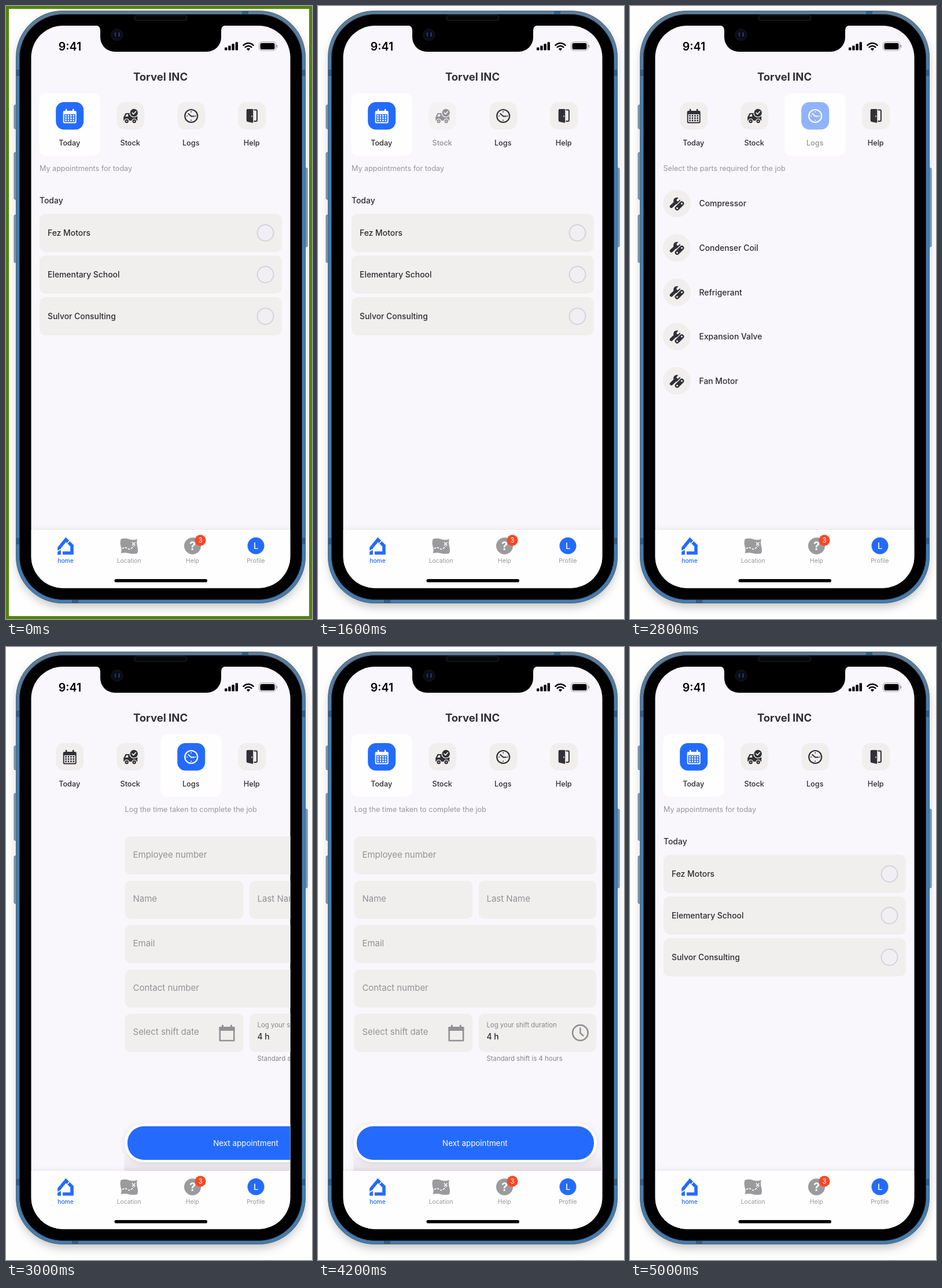
These frames come from a looping animation (529x1059 px, 6.6 s). An HTML page:

```html
<!DOCTYPE html>
<html lang="en">
<head>
<meta charset="utf-8">
<title>Field service app</title>
<style>
  html, body { margin: 0; width: 100%; height: 100%; overflow: hidden; background: #fefefe; }
  svg { display: block; font-family: Inter, sans-serif; --tile: #f1efed; --blue: #246bfd; --ink: #2c2b30; }
  .body { font-size: 13.9px; font-weight: 500; fill: var(--ink); }
  .sub { font-size: 12.6px; fill: #98969b; }
  .field { font-size: 15px; fill: #939196; }
  .small { font-size: 11.4px; fill: #87858b; }
  .nav { font-size: 10.3px; fill: #98979a; }
  .mid { text-anchor: middle; }
  .line { fill: none; stroke: currentColor; stroke-linecap: round; stroke-linejoin: round; }
  .tab { color: #303036; --bg: var(--tile); }
  .tab.on { color: #fff; --bg: var(--blue); }
  .tab .card { fill: none; }
  .tab.on .card { fill: #fefefe; }
  .tab .tile { fill: var(--bg); }
  .tab text { font-size: 12.7px; font-weight: 500; fill: var(--ink); }
</style>
</head>
<body>
<svg id="stage" width="529" height="1059" viewBox="0 0 529 1059"></svg>
<script>
const PAGE_WIDTH = 448, LOOP = 6600, STEP = 200;
const box = (x, y, w, h, r, attrs = '') => `<rect x="${x}" y="${y}" width="${w}" height="${h}" rx="${r}" ${attrs}/>`;
const dot = (x, y, r, attrs = '') => `<circle cx="${x}" cy="${y}" r="${r}" ${attrs}/>`;
const text = (x, y, cls, str, attrs = '') => `<text x="${x}" y="${y}" class="${cls}" ${attrs}>${str}</text>`;
const line = (d, width, attrs = '') => `<path class="line" d="${d}" stroke-width="${width}" ${attrs}/>`;
const range = (n, f) => Array.from({ length: n }, (_, i) => f(i)).join('');
const BG = 'style="fill:var(--bg)"', BG_LINE = 'style="stroke:var(--bg)"';

// Icons are drawn around 0,0 in the current colour
const calendar = box(-11.5, -9, 23, 21.5, 2.5) + box(-9.6, -3, 19.2, 13.6, 1, BG) +
  line('M-6 -11v4M6 -11v4', 2.6) +
  range(12, i => box(-7.9 + i % 4 * 4.4, -1.7 + (i >> 2) * 4, 2.6, 2.6, .4));
const truck = `<path d="M-12 8V2l3-6q.5-1 2-1h6v-2h11q2 0 2 2v13z"/>` +
  `<path d="M-9 1l2-4h3v4z" ${BG}/>` +
  [-6.5, 6.5].map(x => dot(x, 9, 4.6, BG) + dot(x, 9, 3.2) + dot(x, 9, 1.1, BG)).join('') +
  dot(6, -5.5, 8, BG) + dot(6, -5.5, 6.7) + line('M3 -5.5l2.2 2.3 4-4.4', 1.7, BG_LINE);
const clock = dot(0, 0, 11, 'class="line" stroke-width="2.2"') + line('M-5 -4L0 .5h5', 2) +
  line('M0 -7.5v.6M0 7v.6M-7.5 0h.6M7.2 0h.6', 1.7);
const door = '<path d="M-9.5 -10q0-2 2-2H2v24L-7.5 10q-2-.5-2-2.5z"/>' +
  line('M4 -10.5h3.2q1.5 0 1.5 1.5V7.5q0 1.5-1.5 1.5H4', 2) + box(-.8, -1, 1.2, 3, .6, BG);
const wrench = line('M-9.5 5L-1 -3', 5.5) + dot(0, -4.5, 6) + line('M1.5 -6L7 -11.5', 4, BG_LINE) +
  line('M.5 8L8.5 0', 10.5, BG_LINE) + line('M.5 8L8.5 0', 7.8) +
  dot(.5, 8, 1.5, BG) + dot(8.5, 0, 1.5, BG);

const tabs = [['Today', calendar], ['Stock', truck], ['Logs', clock], ['Help', door]].map(([name, icon], i) =>
  `<g class="tab" transform="translate(${110.2 + i * 105} 190)" fill="currentColor">` +
  box(-53, -39, 105.5, 107.5, 12, 'class="card"') +
  `<g class="touch">${box(-24, -24, 48, 47.5, 14, 'class="tile"')}${icon}${text(-.5, 50.7, 'mid', name)}</g></g>`).join('');

const todayPage = text(58, 285, 'sub', 'My appointments for today') + text(58, 341, 'body', 'Today') +
  ['Fez Motors', 'Elementary School', 'Sulvor Consulting'].map((name, i) => {
    const y = 359 + i * 72;
    return box(58, y, 419, 66, 10, 'fill="var(--tile)"') + text(72, y + 38, 'body', name) +
      dot(448.5, y + 33, 14, 'fill="#f1eff4" stroke="#d5d3da" stroke-width="2"');
  }).join('');

const stockPage = text(58, 285, 'sub', 'Select the parts required for the job') +
  ['Compressor', 'Condenser Coil', 'Refrigerant', 'Expansion Valve', 'Fan Motor'].map((name, i) => {
    const y = 341.3 + i * 76.6;
    return `<g transform="translate(81.5 ${y})" color="#303036" fill="currentColor" style="--bg:var(--tile)">` +
      dot(0, 0, 24, BG) + wrench + '</g>' + text(120, y + 5, 'body', name);
  }).join('');

const field = (x, y, w, label) => box(x, y, w, 66, 10, 'fill="var(--tile)"') + text(x + 14, y + 36.7, 'field', label);
const logsPage = text(58, 285, 'sub', 'Log the time taken to complete the job') +
  field(58, 327, 419, 'Employee number') + field(58, 403.7, 205, 'Name') + field(273, 403.7, 204, 'Last Name') +
  field(58, 480.3, 419, 'Email') + field(58, 557, 419, 'Contact number') +
  field(58, 633.6, 205, 'Select shift date') + field(273, 633.6, 204, '') +
  text(287, 657, 'small', 'Log your shift duration') + text(287, 678, 'body', '4 h') +
  text(287, 715, 'small', 'Standard shift is 4 hours') +
  '<g color="#929095">' + line('M222.3 658h24.4v22h-24.4z', 2.6) + box(221, 656, 27, 7, 1, 'fill="currentColor"') +
  line('M227 654v5M242 654v5', 3) + dot(449, 666.5, 13.3, 'class="line" stroke-width="2.7"') +
  line('M449 658.5v8.5l5 4.5', 2.5) + '</g>' +
  box(57, 872, 434, 33, 0, 'fill="url(#shade)"') +
  box(57.5, 823.5, 420, 66.5, 33, 'fill="#fff" filter="url(#lift)"') +
  box(62.5, 828, 410, 58, 28, 'fill="var(--blue)"') +
  text(267, 862, 'mid', 'Next appointment', 'font-size="13.4" fill="#fff"');

const sideButton = 'fill="#8299b1" stroke="#5f748a" stroke-width="1"';
const phone =
  box(20, 16, 496, 1022, 80, 'fill="#888" opacity=".5" filter="url(#blur)"') +
  [[171, 41], [253, 81], [361, 82]].map(([y, h]) => box(14, y, 6, h, 1.5, sideButton)).join('') +
  box(515, 280, 6, 136, 1.5, sideButton) +
  box(17.5, 8.5, 500, 1023, 80, 'fill="url(#metal)" stroke="#4b6275"') +
  '<path d="M18 110h5v11h-5zM512 110h5v11h-5zM18 919h5v11h-5zM512 919h5v11h-5zM408 9h11v5h-11zM114 1026h11v5h-11z" fill="#315d88"/>' +
  box(23.5, 14.5, 488, 1011, 75, 'fill="#000" stroke="#1d2f40"') +
  box(222.5, 16, 90, 9, 3, 'fill="#060606" stroke="#252528"') +
  box(43.5, 34, 448, 971.5, 55, 'fill="#faf7fc"');

const status =
  '<path d="M155 33.500q8 .500 8 8.500V54a25 25 0 0 0 25 25H347a25 25 0 0 0 25-25V42q0-8 8-8.500z"/>' +
  dot(192, 49.5, 10, 'fill="#0b0d13" stroke="#15171d"') + dot(192, 49.5, 5.5, 'fill="#080a18"') +
  line('M189.5 46.5q-2 3 0 5.5', 1.8, 'color="#263c83"') + line('M195 46.5q2 3 0 5.5', 1.8, 'color="#303f92"') +
  text(110.5, 76.5, 'mid', '9:41', 'font-size="19.5" font-weight="600"') +
  range(4, i => box(378 + i * 6.2, 71.5 - i * 3.1, 4.4, 5 + i * 3.1, 1.2)) +
  line('M410.5 67.8a12 12 0 0 1 17 0M413.7 71.2a7.5 7.5 0 0 1 10.6 0', 2.6) +
  '<path d="M415.8 74a4.6 4.6 0 0 1 6.4 0L419 77.2z"/>' +
  box(437.5, 62, 29, 15, 4.5, 'fill="none" stroke="#9b999d"') + box(439.5, 64, 25, 11, 2.8) +
  box(467.5, 67, 1.8, 5, .9, 'fill="#9b999d"') +
  text(267, 129, 'mid', 'Torvel INC', 'font-size="18.5" font-weight="700" fill="#2f2f33"');

const house = line('M92 948V936L103.500 922 114 932.500V945H98', 5.6, 'style="stroke-linecap:butt;stroke-linejoin:miter"') +
  line('M106.500 927.500L112 921.500M88 942.500L96 938', 1.6, 'style="stroke:#fefefe"');
const nav = box(43.5, 905, 448, 101, 0, 'fill="#fefefe" filter="url(#navShadow)"') +
  `<g color="#246bfd">${house}</g>` +
  '<path d="M198.5 921q7-2.500 14 0t14.500 0q-2 6 0 12.500t0 12q-7 2-14.500 0t-14 0q2-6 0-12t0-12.500z" fill="#9b9a9c"/>' +
  line('M201.5 937q4-3 8 0t8-1q3-1 3-3', 1.7, 'color="#fff" stroke-dasharray="2 3.400"') +
  line('M218.500 927l4.500 4.500M223 927l-4.500 4.500', 1.7, 'color="#fff"') +
  dot(322.5, 932.7, 14.5, 'fill="#9b9a9c"') +
  text(322.5, 940, 'mid', '?', 'font-size="20" font-weight="700" fill="#fff"') +
  dot(336, 923, 9.5, 'fill="#fb4726"') + text(336, 927, 'mid', '3', 'font-size="11.5" fill="#fff"') +
  dot(432, 932.5, 14.5, 'fill="var(--blue)"') +
  text(432.2, 937.8, 'mid', 'L', 'font-size="14.5" font-weight="500" fill="#fff"') +
  text(103, 962, 'nav mid', 'home', 'style="fill:var(--blue)" font-weight="500"') +
  ['Location', 'Help', 'Profile'].map((name, i) => text(212.7 + i * 109.6, 962, 'nav mid', name)).join('') +
  box(187.5, 990, 160.5, 5.6, 2.8);

const stage = document.getElementById('stage');
stage.innerHTML = `<defs>
  <filter id="blur" x="-20%" y="-10%" width="140%" height="120%"><feGaussianBlur stdDeviation="8"/></filter>
  <filter id="lift" x="-10%" y="-50%" width="120%" height="200%"><feDropShadow dx="0" dy="2" stdDeviation="5" flood-color="#54465c" flood-opacity=".16"/></filter>
  <filter id="navShadow" x="-10%" y="-20%" width="120%" height="140%"><feDropShadow dx="0" dy="-1" stdDeviation="3.5" flood-opacity=".08"/></filter>
  <linearGradient id="shade" x2="0" y2="1"><stop stop-color="#e9e2eb" stop-opacity="0"/><stop offset="1" stop-color="#e9e2eb"/></linearGradient>
  <linearGradient id="metal" x2="0" y2="1"><stop stop-color="#5f7c96"/><stop offset=".15" stop-color="#447cae"/></linearGradient>
  <clipPath id="screen">${box(43.5, 34, 448, 971.5, 55)}</clipPath></defs>` + phone +
  `<g clip-path="url(#screen)">${tabs}` +
  [todayPage, stockPage, logsPage].map(p => `<g class="page">${p}</g>`).join('') + nav + `</g>` + status +
  box(2.5, 2.5, 524, 1054, 0, 'id="border" fill="none" stroke="#528309" stroke-width="5"');

const tabNodes = stage.querySelectorAll('.tab'), pageNodes = stage.querySelectorAll('.page');
const border = document.getElementById('border');
const slides = [
  { start: 1600, from: 0, to: 1 },
  { start: 2774, from: 1, to: 2 },
  { start: 4146, from: 2, to: 0 },
];
const ease = p => p < .5 ? 4 * p ** 3 : 1 - 4 * (1 - p) ** 3;

function render(t) {
  const active = t < 1800 ? 0 : t < 2800 ? 1 : t < 4200 ? 2 : 0;
  const pressed = t === 1600 ? 1 : t === 2800 ? 2 : -1;
  tabNodes.forEach((tab, i) => {
    tab.classList.toggle('on', i === active);
    tab.querySelector('.touch').setAttribute('opacity', i === pressed ? .5 : 1);
  });

  const { start, from, to } = slides.findLast(s => t >= s.start) || slides[0];
  const p = ease(Math.min(1, Math.max(0, (t - start) / 400)));
  const dir = Math.sign(to - from);
  pageNodes.forEach((page, i) => {
    const x = i === from ? -p : i === to ? 1 - p : 2;
    page.setAttribute('transform', `translate(${x * dir * PAGE_WIDTH} 0)`);
  });
  border.setAttribute('visibility', t < 200 ? 'visible' : 'hidden');
}

const begin = performance.now();
function tick() {
  const t = (performance.now() - begin) % LOOP;
  render(Math.floor(t / STEP) * STEP); // the screen updates five times a second
  requestAnimationFrame(tick);
}
tick();
</script>
</body>
</html>
```
